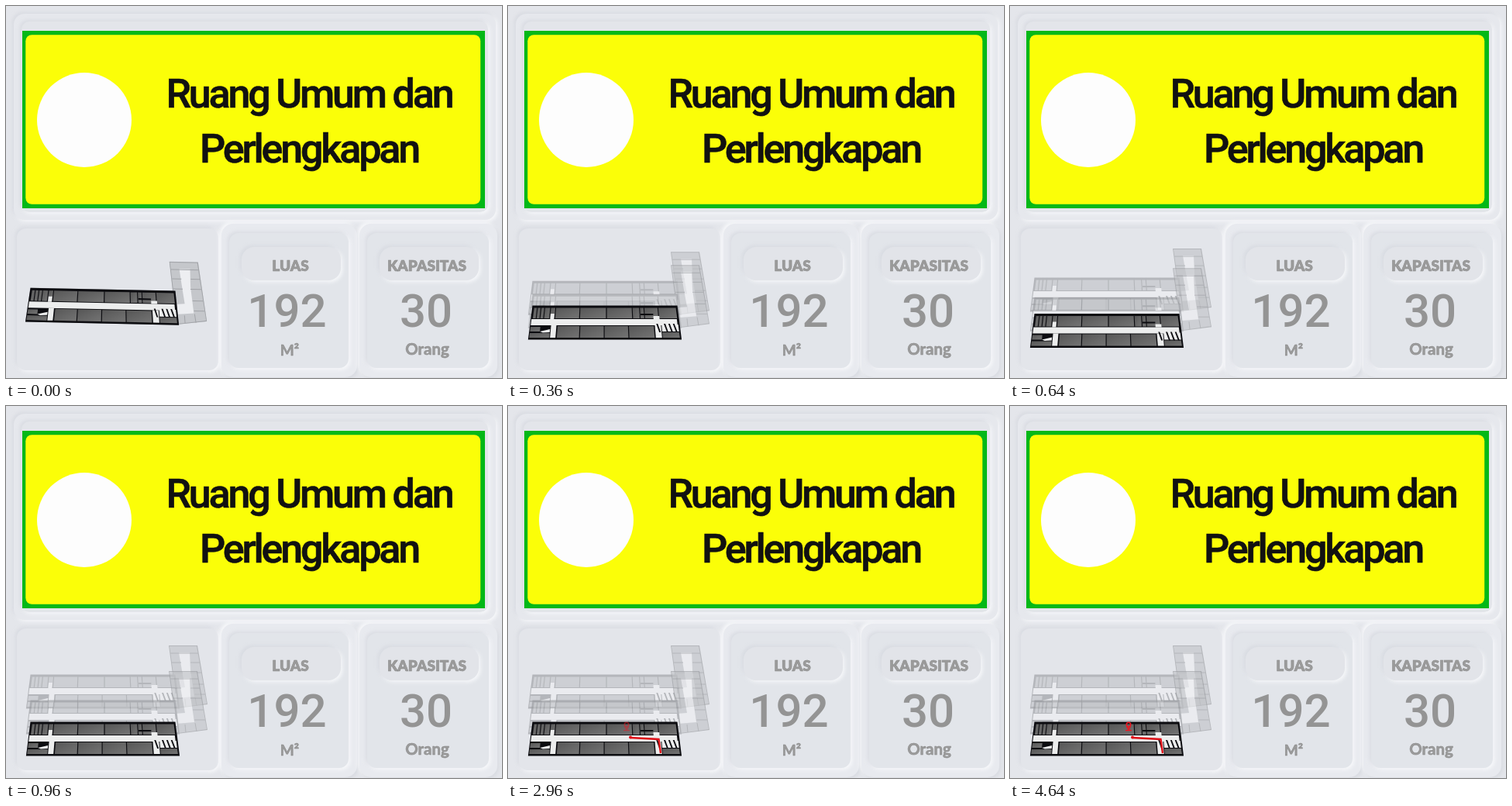
Animation, 640 px wide and 480 px high, one loop 5.12 s. Source, as an HTML page:

```html
<!DOCTYPE html>
<html lang="id">
<head>
<meta charset="utf-8">
<title>Ruang Umum dan Perlengkapan</title>
<style>
html, body { margin: 0; width: 100%; height: 100%; overflow: hidden; background: #e4e6eb; }
svg { display: block; width: 100vw; height: 100vh; }
text { text-anchor: middle; }
.title { font: 500 52px Roboto, sans-serif; letter-spacing: -3.2px; fill: #111; stroke: #111; stroke-width: .6; }
.label { font: 900 19px Lato, sans-serif; fill: #9b9b9b; stroke: #858585; stroke-width: .5; }
.unit { font-weight: 700; }
.value { font: 500 60px Roboto, sans-serif; fill: #949494; }
</style>
</head>
<body>
<svg viewBox="0 0 640 480" xmlns="http://www.w3.org/2000/svg">
  <defs>
    <filter id="soft" x="-20%" y="-20%" width="140%" height="140%"><feGaussianBlur stdDeviation="2.5"/></filter>
    <linearGradient id="room" x1="0" y1="0" x2="1" y2="1">
      <stop offset="0" stop-color="#565656"/><stop offset="1" stop-color="#747474"/>
    </linearGradient>
  </defs>
  <rect width="640" height="480" fill="#e4e6eb"/>
  <g id="panels"></g>
  <rect x="21" y="32" width="597" height="229" fill="#04b817"/>
  <rect x="25.3" y="37.2" width="586.9" height="218.6" rx="8" fill="#fbfe08"/>
  <circle cx="101" cy="147" r="61" fill="#fdfdfd"/>
  <text class="title" x="391" y="131">Ruang Umum dan</text>
  <text class="title" x="391" y="202">Perlengkapan</text>
  <text class="label" x="367" y="342">LUAS</text>
  <text class="label" x="543" y="342">KAPASITAS</text>
  <text class="value" x="362.5" y="414">192</text>
  <text class="value" x="542" y="414">30</text>
  <text class="label unit" x="366" y="451">M²</text>
  <text class="label unit" x="543.5" y="450" style="font-size:20.5px">Orang</text>
  <g id="floors"></g>
  <path id="route" d="M197 448L194.5 430L158 428" pathLength="1" fill="none"
        stroke="#e01018" stroke-width="2.4" stroke-dasharray="1 2"/>
  <circle id="tip" cx="158" cy="427.5" r="2" fill="#e01018"/>
  <g id="pin" fill="none" stroke="#ee1520" stroke-width="1.6">
    <circle cx="153" cy="411" r="2.7"/>
    <path d="M150.5 413.5L153 417L155.5 413.5M149 418.5H157"/>
  </g>
</svg>
<script>
const NS = 'http://www.w3.org/2000/svg', LOOP = 5120;
const $ = id => document.getElementById(id);

function add(parent, tag, attrs) {
  const el = document.createElementNS(NS, tag);
  for (const k in attrs) el.setAttribute(k, attrs[k]);
  return parent.appendChild(el);
}

// Embossed rounded rectangle: blurred light and shade behind a flat face.
function emboss(x, y, width, height, rx, fill, up = 1) {
  const box = { width, height, rx }, p = $('panels');
  add(p, 'rect', { ...box, x: x - 2 * up, y: y - 2 * up, fill: '#fafbfd', filter: 'url(#soft)' });
  add(p, 'rect', { ...box, x: x + 2 * up, y: y + 2 * up, fill: '#d3d6dd', filter: 'url(#soft)', opacity: .75 });
  add(p, 'rect', { ...box, x, y, fill });
}

emboss(10, 10, 622, 266, 14, '#e6e8ed', -1);
emboss(20, 20, 602, 246, 10, '#e3e5ea', -1);
emboss(14, 287, 260, 183, 12, '#e3e5ea', -1);
for (const x of [278, 456]) {
  const w = x < 300 ? 175 : 178;
  emboss(x, 281, w, 198, 15, '#e8eaef');
  emboss(x + 10, 293, w - 21, 174, 12, '#e2e5ea', -1);
  emboss(x + 26, 311, 128, 43, 16, '#e2e4e9', -1);
}

// Plan coordinates: x at the front wall, y down from the back wall.
const lean = (x, y) => (125 + (x - 125) * (.945 + .055 * y / 43)).toFixed(1) + ',' + y;
const quad = (x1, y1, x2, y2) =>
  [lean(x1, y1), lean(x2, y1), lean(x2, y2), lean(x1, y2)].join(' ');
const backWalls = [28, 33, 38, 43, 51, 58, 91, 127, 162, 172, 178, 197, 222];
const frontWalls = [62, 92, 124, 156, 190];

function floor(ghost) {
  const g = add($('floors'), 'g', ghost ? { opacity: .6 } : {});
  const c = ghost
    ? { wall: '#96989c', room: '#c0c2c6', hall: '#eff0f3' }
    : { wall: '#0c0c10', room: 'url(#room)', hall: '#eceded' };
  const poly = (points, fill) => add(g, 'polygon', { points, fill });
  const cell = (x1, y1, x2, y2, fill = c.room) => poly(quad(x1, y1, x2, y2), fill);

  if (ghost) {
    poly('210,-38 247,-38 260,38 221,43', c.wall);
    poly('211,-37 246,-37 259,37 222,42', c.room);
    poly('223,-29 237,-29 238,-6 243,28 219,30 218,17 231,16 227,-6', c.hall);
    add(g, 'path', {
      d: 'M212 -28H248M214 -16H226M238 -16H250M216 -3H228M238 -3H252M241 12H255M243 25H257M231 31L232 41M244 29L246 40',
      stroke: c.wall, fill: 'none'
    });
  }
  cell(26, -.5, 224, 43.5, c.wall);
  cell(27, 17, 221, 25, c.hall);
  backWalls.slice(1).forEach((x, i) => cell(backWalls[i] + .7, 2.5, x - .5, 16));
  cell(52, 10, 57, 17, c.hall);
  cell(173, 10, 190, 12, c.wall);
  cell(190, 13, 198, 17, c.hall);

  frontWalls.slice(1).forEach((x, i) => cell(frontWalls[i] + .7, 26, x - .5, 41));
  cell(27, 27, 40, 33);
  cell(27, 35, 53, 41);
  poly([lean(40, 33), lean(53, 30), lean(53, 34), lean(44, 34.5)].join(' '), c.hall);
  cell(54, 25, 61, 41, c.hall);
  cell(191, 25, 199, 41, c.hall);
  cell(200, 24, 222, 33, c.hall);
  cell(200, 34, 222, 41);
  for (const x of [193, 203, 209, 215]) {
    poly([lean(x, 23), lean(x + 2, 23), lean(x + 5, 34), lean(x + 3, 34)].join(' '), c.wall);
  }
  return g;
}

const upper = floor(true), middle = floor(true), ground = floor(false);

// Fast start, then a nearly steady spread of the storeys.
const keys = [[0, 0], [200, .36], [480, .64], [960, 1]];
function spread(t) {
  for (let i = 1; i < keys.length; i++) {
    const [a, u] = keys[i - 1], [b, v] = keys[i];
    if (t < b) return u + (v - u) * (t - a) / (b - a);
  }
  return 1;
}

function pinAlpha(t) {
  if (t < 2960) return 0;
  if (t < 3000) return .5;
  if (t < 3120) return 1;
  const phase = (t - 3120) % 1000;
  if (phase < 40) return .5;
  if (phase < 480) return 0;
  return phase < 520 ? .5 : 1;
}

function draw(t) {
  const s = spread(t);
  const tilt = 1.2 * Math.max(0, 1 - s / .5);
  const place = (el, dy) =>
    el.setAttribute('transform', `translate(0 ${364 + dy * s}) rotate(${tilt} 26 0)`);
  place(upper, -17);
  place(middle, 16);
  place(ground, 44);

  const drawn = Math.min(1, Math.max(0, (t - 1160) / 940));
  $('route').setAttribute('stroke-dashoffset', 1 - drawn);
  $('route').setAttribute('visibility', drawn ? 'visible' : 'hidden');
  $('tip').setAttribute('visibility', drawn === 1 ? 'visible' : 'hidden');
  $('pin').setAttribute('opacity', pinAlpha(t));
}

const start = performance.now();
function tick() {
  draw((performance.now() - start) % LOOP);
  requestAnimationFrame(tick);
}
tick();
</script>
</body>
</html>
```
